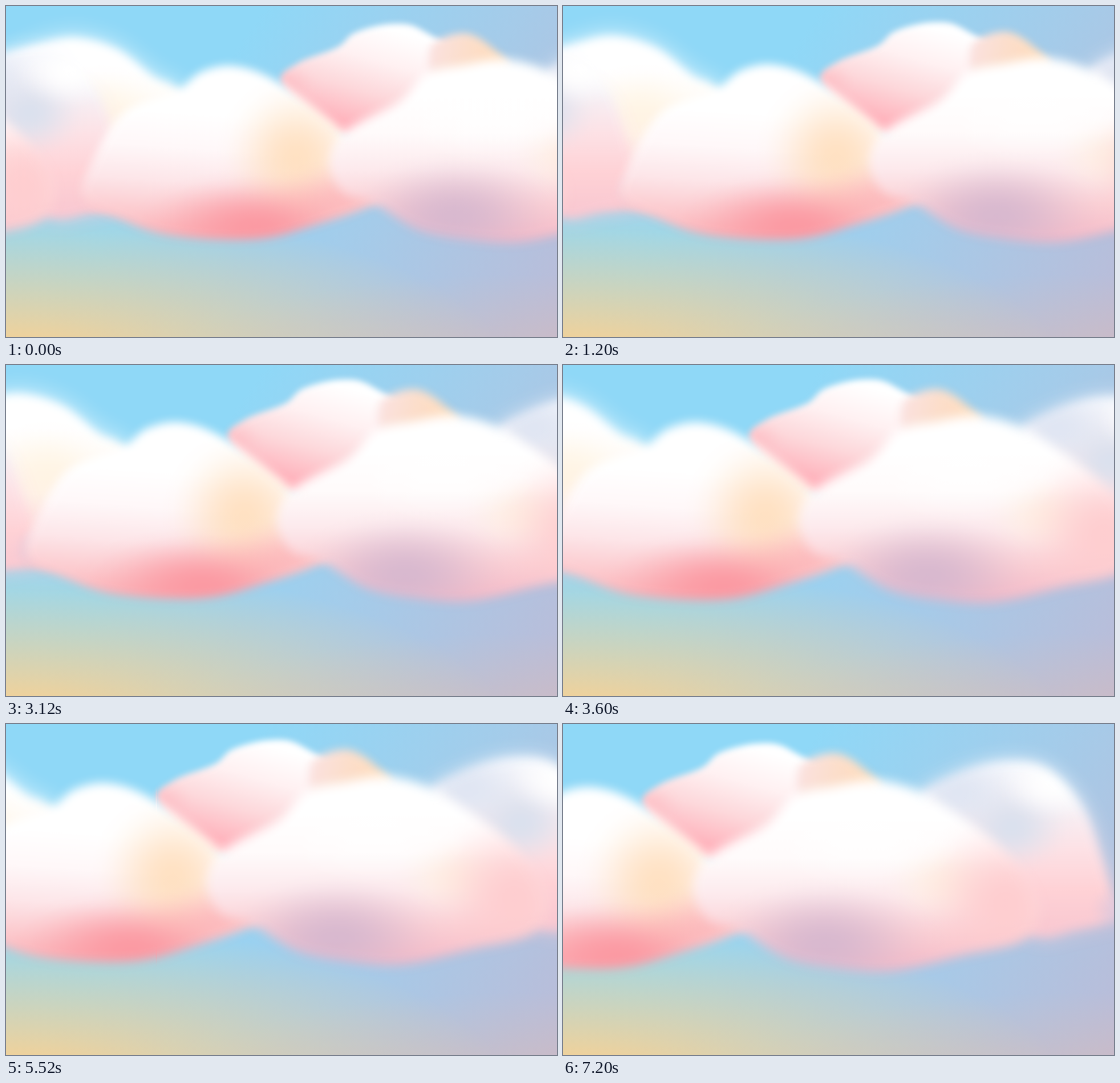
An HTML page that plays this animation: 966x580 px, repeating every 8000 ms.

```html
<!DOCTYPE html>
<html lang="en">
<head>
<meta charset="utf-8">
<title>Clouds</title>
<style>
  html, body { margin: 0; width: 100%; height: 100%; overflow: hidden; }
  svg { display: block; width: 966px; height: 580px; }
</style>
</head>
<body>
<svg viewBox="0 0 966 580">
  <defs id="defs"></defs>
  <g id="sky"></g>
  <g id="rear"></g>
  <g id="wrap"></g>
  <g id="main"></g>
</svg>
<script>
const $ = id => document.getElementById(id);
const AREA = { x: -250, y: -100, width: 1700, height: 700 };
let uid = 0;

function el(parent, tag, attrs) {
  const node = document.createElementNS('http://www.w3.org/2000/svg', tag);
  for (const key in attrs) node.setAttribute(key, attrs[key]);
  return parent.appendChild(node);
}

// Paint with evenly spaced colours along a line
function linear([x1, y1, x2, y2], colors) {
  const id = 'paint' + uid++;
  const grad = el($('defs'), 'linearGradient',
    { id, gradientUnits: 'userSpaceOnUse', x1, y1, x2, y2 });
  colors.split(' ').forEach((color, i, all) =>
    el(grad, 'stop', { offset: i / (all.length - 1), 'stop-color': color }));
  return `url(#${id})`;
}

// Paint that fades outwards; fade maps the radius 0..1 to an opacity
function radial(color, fade) {
  const id = 'paint' + uid++;
  const grad = el($('defs'), 'radialGradient', { id });
  for (let r = 0; r <= 1; r += 0.125)
    el(grad, 'stop', { offset: r, 'stop-color': color, 'stop-opacity': fade(r) });
  return `url(#${id})`;
}

function blur(stdDeviation) {
  const id = 'blur' + uid++;
  const filter = el($('defs'), 'filter', { id, filterUnits: 'userSpaceOnUse', ...AREA });
  el(filter, 'feGaussianBlur', { stdDeviation });
  return `url(#${id})`;
}

// Closed Catmull-Rom curve through "x,y x,y ..."
function curve(text) {
  const p = text.split(' ').map(s => s.split(',').map(Number));
  const at = i => p[(i + p.length) % p.length];
  const ctrl = (from, prev, next) => from.map((v, k) => v + (next[k] - prev[k]) / 6);
  return 'M' + p[0] + p.map((b, i) => {
    const c = at(i + 1);
    return `C${ctrl(b, at(i - 1), c)} ${ctrl(c, at(i + 2), b)} ${c}`;
  }).join('') + 'Z';
}

// Soft outline, filled with a gradient and tinted by glowing blobs
function cloud(id, { shape, soft, halo, line, colors, blobs = [] }) {
  const d = curve(shape);
  const mask = el($('defs'), 'mask', { id: id + 'Mask', maskUnits: 'userSpaceOnUse', ...AREA });
  if (halo) el(mask, 'path', { d, fill: '#fff', stroke: '#fff', 'stroke-width': halo,
    opacity: 0.5, filter: blur(halo) });
  el(mask, 'path', { d, fill: '#fff', filter: blur(soft) });

  const group = el($('defs'), 'g', { id, mask: `url(#${id}Mask)` });
  el(group, 'rect', { ...AREA, fill: linear(line, colors) });
  for (const [cx, cy, rx, ry, color, alpha] of blobs)
    el(group, 'ellipse', { cx, cy, rx, ry,
      fill: radial(color, r => alpha * Math.cos(r * Math.PI / 2) ** 2) });
}

const full = { width: 966, height: 580 };
el($('sky'), 'rect', { ...full, fill: linear([350, 150, 966, 580], '#8fd8f7 #a5cbe9 #bcbbd7') });
el($('sky'), 'ellipse', { cx: 0, cy: 640, rx: 880, ry: 295,
  fill: radial('#f7d194', r => Math.min(1, 1.15 * (1 - r))) });
el($('sky'), 'ellipse', { cx: 900, cy: 640, rx: 620, ry: 170,
  fill: radial('#e6bca8', r => 0.45 * (1 - r)) });

cloud('cream', {
  shape: '-40,150 20,92 70,68 130,58 200,78 262,125 310,152 400,260 250,345 60,342 -60,280',
  soft: 8, halo: 18,
  line: [0, 60, 0, 340],
  colors: '#fff #fff #fffcf7 #fff2ec #fddcdb #fcc6c9',
  blobs: [[175, 195, 120, 90, '#fff3df', 0.7]]
});

cloud('rose', {
  shape: '483,135 512,102 580,75 612,49 675,34 728,45 800,110 700,215 598,230 540,200',
  soft: 5,
  line: [655, 40, 608, 205],
  colors: '#fff #fff1f2 #fdd8db #ffb5be',
  blobs: [[490, 140, 60, 45, '#fdc0c6', 0.7]]
});

cloud('peach', {
  shape: '742,75 800,50 850,76 875,115 760,140',
  soft: 7,
  line: [745, 70, 860, 95],
  colors: '#fbe2e0 #fcdecb #ffddbd'
});

cloud('lilac', {
  shape: '945,130 985,93 1070,66 1150,74 1212,139 1245,229 1262,285 1290,315 1202,342 1120,345 1000,220',
  soft: 8, halo: 15,
  line: [0, 70, 0, 345],
  colors: '#f6f8fd #f6f1f6 #fde2e6 #ffd2d6 #f9c8d1',
  blobs: [
    [1005, 115, 130, 90, '#dbe3f2', 0.8],
    [1095, 172, 105, 85, '#dbe1ee', 1],
    [1165, 100, 100, 70, '#fff', 1],
    [1275, 310, 55, 50, '#d9c8de', 0.8]
  ]
});

cloud('left', {
  shape: '300,152 345,117 405,107 480,136 590,220 665,320 640,348 550,380 440,407 290,400 200,370 140,338 150,285 208,190',
  soft: 8,
  line: [20, 110, 0, 405],
  colors: '#fff #fff #fff8f9 #fde6e9 #fcc9cd #fca9ae',
  blobs: [
    [510, 265, 140, 145, '#ffdfbd', 0.9],
    [600, 335, 150, 70, '#fdb8ba', 0.8],
    [440, 385, 230, 100, '#fb98a1', 0.95]
  ]
});

cloud('right', {
  shape: '568,270 600,217 690,167 735,120 800,105 870,95 940,113 1013,158 1089,219 1140,300 1115,360 1013,386 900,411 805,407 720,390 645,345 590,325',
  soft: 9,
  line: [0, 100, 0, 410],
  colors: '#fff #fff #fffbfb #fdeaed #fbd0d5 #f5b9c6',
  blobs: [
    [985, 265, 110, 75, '#fff0e2', 0.8],
    [1085, 290, 160, 150, '#ffcbcd', 0.9],
    [785, 365, 200, 110, '#d3b6cf', 0.85],
    [850, 175, 190, 110, '#fff', 0.9]
  ]
});

const put = (group, ids) => ids.split(' ').forEach(id => el($(group), 'use', { href: '#' + id }));
put('rear', 'cream');
put('wrap', 'lilac right');
put('main', 'rose peach lilac left right');

// Held steps: the row drifts left, bobs and slowly grows
const DURATION = 8000, HOLD = 1200, STEPS = 7;

function play(id, place) {
  const pose = i => `translate(${place(i).join('px, ')}px) scale(${1.012 + 0.0075 * i})`;
  const frames = Array.from({ length: STEPS + 1 }, (_, i) => ({
    offset: Math.min(1, i * HOLD / DURATION),
    transform: pose(Math.min(i, STEPS - 1)),
    easing: 'steps(1, end)'
  }));
  $(id).animate(frames, { duration: DURATION, iterations: Infinity });
}

const bob = i => -6 + 4 * Math.cos(2 * Math.PI * (i - 6.2) / STEPS);
const drift = i => [Math.min(-7, 25 - 66 * i), bob(i)];
play('rear', drift);
play('main', drift);
play('wrap', i => [-1068 - 90 * i, bob(i) + 16]);
</script>
</body>
</html>
```
